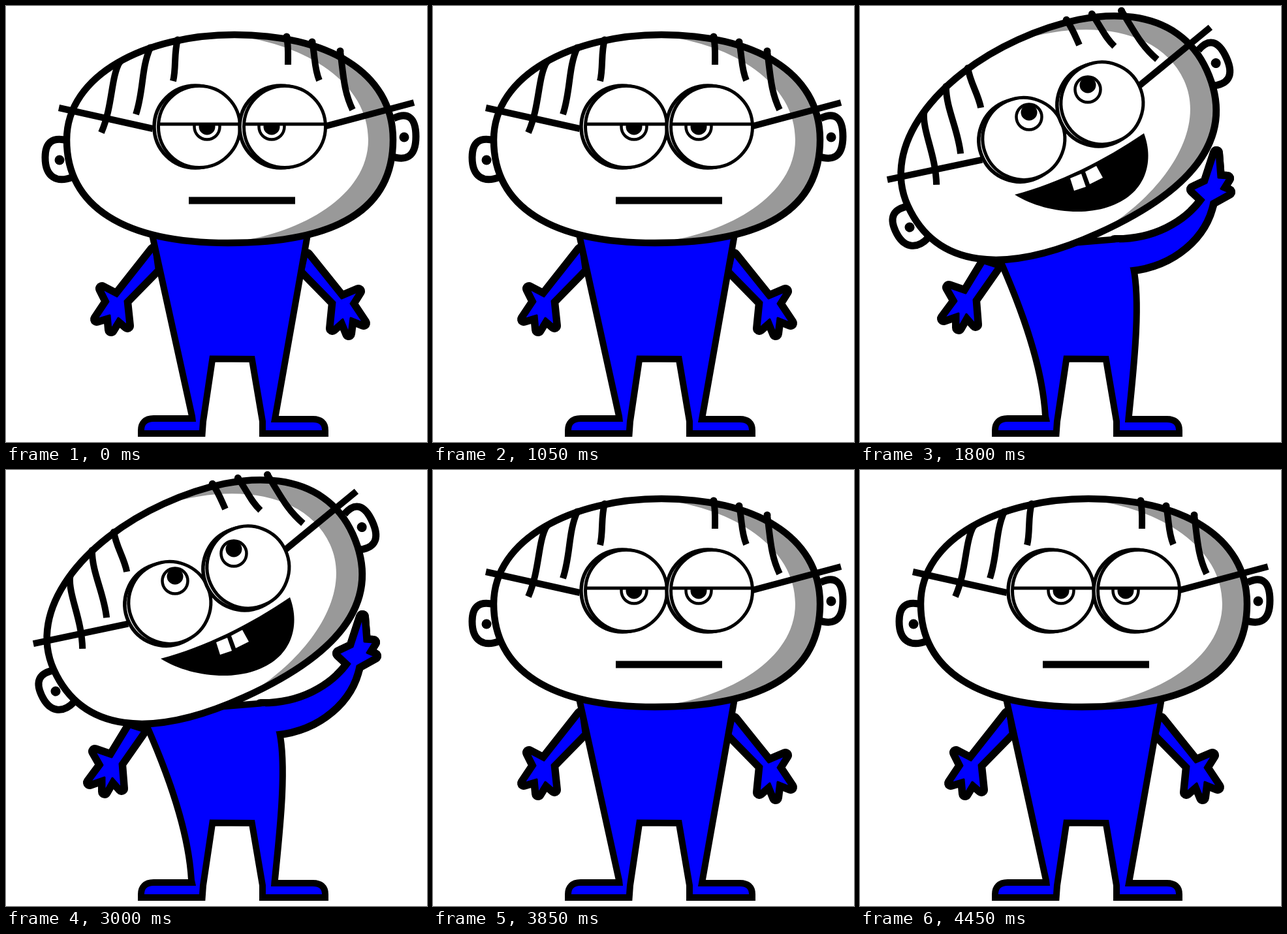
An HTML page with a canvas that plays this animation: 645 px wide and 668 px high, repeating every 4850 ms.

```html
<!DOCTYPE html>
<html lang="en">
<head>
<meta charset="utf-8">
<title>Cheerful wave</title>
<style>
  html, body { margin: 0; width: 100%; height: 100%; overflow: hidden; background: #fff; }
  canvas { display: block; }
</style>
</head>
<body>
<canvas id="stage" width="645" height="668"></canvas>
<script>
const ctx = document.getElementById('stage').getContext('2d');
const LOOP = 4850;
const BLUE = '#0000ff', GREY = '#999';
const path = d => new Path2D(d);

// Both feet and the crotch; dx shifts the left foot.
const legs = dx => `L${291 + dx},637 L${226 + dx},637 C${216 + dx},637 ${212 + dx},642 ${212 + dx},650
  L${296 + dx / 2},650 L${297 + dx / 2},636 L312,535.5 L381,536 L398,636 L398,650 L484,650
  C484,642 480,638 470,638 L406,638 `;

const head = {
  outline: path('M93,205 C93,105 215,44 350,44 C490,44 593,100 593,205 C593,317 498,363 340,363 C182,363 93,308 93,205Z'),
  shade: path('M350,44 C490,44 593,100 593,205 C593,317 498,363 340,363 L358,360 C450,347 555,292 555,205 C555,118 460,59 352,46Z'),
  ears: [
    path('M94,206 C70,200 60,210 60,232 C60,262 78,272 102,262'),
    path('M594,172 C615,162 628,170 628,200 C628,232 612,238 590,230')
  ],
  earHoles: [[82, 236], [610, 201]],
  temples: path('M81,156 L225,188 M490,184 L625,148'),
  strands: [
    [174, 86, 'C160,112 164,152 146,194'],
    [221, 64, 'C207,95 211,130 199,166'],
    [263, 52, 'C257,72 261,95 256,115'],
    [430, 47, 'C433,62 432,75 432,90'],
    [469, 55, 'C474,80 472,95 480,114'],
    [512, 69, 'C517,105 517,130 531,159']
  ].map(([x, y, curve]) => ({ x, y, line: path(`M${x},${y} ${curve}`) })),
  eyes: [296, 427]
};

const bored = {
  ear: [82, 236], tilt: 0, scale: 1,
  body: path(`M229,350 L290,628 ${legs(0)} L457,350Z`),
  backArms: [
    path('M226,374 L170,445 L147,433 L157,453 L139,480 L159,474 L161,496 L172,478 L186,490 L182,452 L230,403Z'),
    path('M461,382 L514,448 L540,437 L528,456 L548,486 L528,478 L525,502 L516,480 L500,494 L504,454 L456,405Z')
  ],
  pupils: [[308, 185], [407, 185]], pupilLift: 0, lids: true,
  mouth() { line(path('M280,298 L443,298'), 11); }
};

const smiling = {
  ear: [45, 279], tilt: -11.7, scale: 1.024,
  body: path(`M213,370 C252,455 283,545 287,628 ${legs(-4)} C413,565 426,460 412,388 L395,357 L295,364Z`),
  backArms: [path('M200,372 L160,440 L132,428 L143,450 L123,479 L147,470 L147,492 L160,468 L173,486 L170,447 L206,397Z')],
  frontArm: path('M390,357 L496,376 L502,354 L510,368 L564,373 L520,382 L536,400 L515,394 L512,407 L492,384 L412,388 L390,388Z'),
  pupils: [[261, 167], [360, 147]], pupilLift: 0,
  mouth() { line(path('M254,279 C315,322 368,318 417,245'), 10); }
};

const laughing = {
  ear: [76, 339], tilt: -24.4, scale: 1.006,
  body: path(`M222,394 C256,472 285,555 289,628 ${legs(0)} C413,565 426,460 414,402 L397,362 L325,368Z`),
  backArms: [path('M190,394 L162,440 L136,431 L148,452 L128,479 L151,471 L151,493 L163,472 L177,488 L174,450 L209,400Z')],
  frontArm: path('M390,361 C450,362 500,335 527,297 L510,281 L531,271 L546,225 L549,263 L563,264 L553,280 L565,285 L538,300 C528,352 480,395 414,402 L390,402Z'),
  pupils: [[259, 170], [349, 128]], pupilLift: 7,
  mouth() {
    fill(path('M237,289 C305,271 375,236 435,195 C452,240 437,290 380,308 C335,323 275,313 237,289Z'), '#000');
    fill(path('M322,264 L339,257 L346,277 L328,283Z M345,254 L362,245 L372,263 L352,273Z'), '#fff');
  }
};

function line(shape, width, join = 'miter') {
  ctx.strokeStyle = '#000';
  ctx.lineWidth = width;
  ctx.lineJoin = join;
  ctx.stroke(shape);
}

function fill(shape, colour) {
  ctx.fillStyle = colour;
  ctx.fill(shape);
}

function circle(x, y, r) {
  const p = new Path2D();
  p.arc(x, y, r, 0, Math.PI * 2);
  return p;
}

function ring(x, y, r, width) {
  const p = circle(x, y, r);
  fill(p, '#fff');
  line(p, width);
}

// The thin second stroke shortens the blue inside narrow fingers.
function drawArm(arm) {
  line(arm, 20, 'round');
  fill(arm, BLUE);
  line(arm, 3, 'round');
}

function drawBody({ body, backArms, frontArm }) {
  backArms.forEach(drawArm);
  line(body, 20);
  if (frontArm) drawArm(frontArm);
  fill(body, BLUE);
}

function drawHead({ ear, tilt, scale }) {
  ctx.save();
  ctx.translate(...ear);
  ctx.rotate(tilt * Math.PI / 180);
  ctx.scale(scale, scale);
  ctx.translate(-82, -236);

  head.ears.forEach((shape, i) => {
    fill(shape, '#fff');
    line(shape, 11);
    fill(circle(...head.earHoles[i], 7.5), '#000');
  });
  fill(head.outline, '#fff');
  fill(head.shade, GREY);
  line(head.outline, 10.5);
  for (const { x, y, line: strand } of head.strands) {
    line(strand, 10);
    fill(circle(x, y, 5.5), '#000');
  }
  line(head.temples, 10);
  for (const x of head.eyes) {
    ring(x - 6, 185, 63, 5.5);
    ring(x, 185, 62.5, 5);
  }
  ctx.restore();
}

function drawPupils({ pupils, pupilLift, lids }) {
  ctx.save();
  if (lids) {
    ctx.beginPath();
    ctx.rect(0, 181, 645, 100);
    ctx.clip();
  }
  for (const [x, y] of pupils) {
    ring(x, y, 19.5, 4.5);
    fill(circle(x, y - pupilLift, 12.5), '#000');
  }
  ctx.restore();
  if (lids) for (const x of head.eyes) line(path(`M${x - 62},181 h124`), 5);
}

// The raised hand passes in front of the head.
function drawRaisedHand(pose) {
  ctx.save();
  ctx.beginPath();
  ctx.rect(490, 205, 155, 105);
  ctx.clip();
  drawBody(pose);
  ctx.restore();
}

function poseAt(t) {
  if (t < 1750 || t >= 3850) return bored;
  return t < 1800 || t >= 3800 ? smiling : laughing;
}

function draw(pose) {
  ctx.fillStyle = '#fff';
  ctx.fillRect(0, 0, 645, 668);
  drawBody(pose);
  drawHead(pose);
  drawPupils(pose);
  pose.mouth();
  if (pose.frontArm) drawRaisedHand(pose);
}

const start = performance.now();
function tick() {
  draw(poseAt((performance.now() - start) % LOOP));
  requestAnimationFrame(tick);
}
tick();
</script>
</body>
</html>
```
